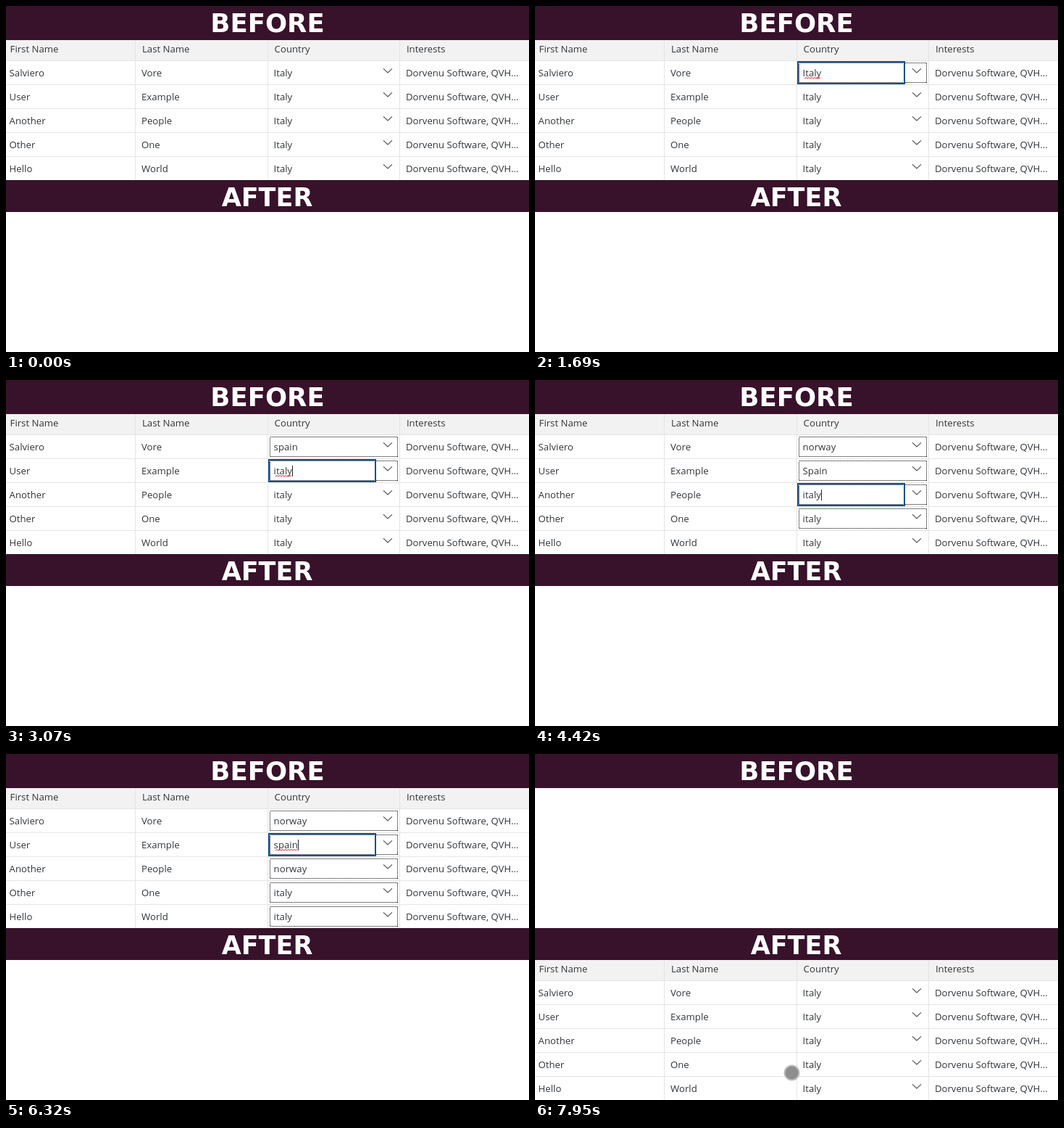
Recreate the animation shown at these times as an HTML page. Size 722 px wide and 477 px high, loop 8000 ms.

```html
<!DOCTYPE html>
<html lang="en">
<head>
<meta charset="utf-8">
<title>Before and after</title>
<style>
html, body { margin: 0; width: 100%; height: 100%; overflow: hidden; background: #fff; }
svg { display: block; width: 722px; height: 477px; }
text { font: 13.2px "Open Sans", "Noto Sans", sans-serif; fill: #32363a; white-space: pre; }
.title { font: bold 35.5px "DejaVu Sans", sans-serif; fill: #fff; text-anchor: middle; }
.band { fill: #38122a; }
.line { fill: #e5e5e5; }
.arrow { fill: none; stroke: #4a4d50; stroke-width: 1.1; }
.dots { fill: none; stroke: #000; stroke-dasharray: 1 1; shape-rendering: crispEdges; }
.focus { fill: none; stroke: #14508f; stroke-width: 2; }
.wave { fill: none; stroke: #e0233a; stroke-width: 1; }
</style>
</head>
<body>
<svg id="stage" viewBox="0 0 722 477"></svg>
<script>
const LOOP = 8000, SWITCH = 7870, ROW = 33;
const COLS = [0, 182.4, 365, 547.3];
const HEADS = ["First Name", "Last Name", "Country", "Interests"];
const PEOPLE = [["Salviero", "Vore"], ["User", "Example"], ["Another", "People"], ["Other", "One"], ["Hello", "World"]];
const INTERESTS = "Dorvenu Software, QVH…";
const WORDS = { I: "Italy", i: "italy", S: "Spain", s: "spain", n: "norway" };

// start, focused row, country per row, outlined rows, caret (c) and spelling wave (~)
const STEPS = [
  [0, 0, "IIIII", "", ""],
  [1130, 1, "IIIII", "1", "c~"],
  [1690, 1, "IIIII", "1", "~"],
  [1840, 1, "iIIII", "1", "c~"],
  [1990, 2, "iiIII", "12", "c~"],
  [2150, 3, "iiiII", "123", "c~"],
  [2300, 4, "iiiiI", "1234", "c~"],
  [2450, 5, "iiiiI", "12345", "c~"],
  [2600, 4, "iiiiI", "1234", "c~"],
  [2780, 1, "iiiiI", "1", "c~"],
  [2920, 1, "siiiI", "1", "c~"],
  [3070, 2, "siiiI", "12", "c~"],
  [3190, 3, "siiiI", "123", "c~"],
  [3340, 4, "siiiI", "1234", "c~"],
  [3480, 1, "siiiI", "1234", "c~"],
  [3600, 1, "niiiI", "1234", "c~"],
  [3820, 2, "niiiI", "1234", "c~"],
  [3970, 2, "nSiiI", "1234", "c~"],
  [4150, 3, "nSiiI", "1234", "c"],
  [4460, 3, "nSiiI", "1234", "c~"],
  [4560, 4, "nsiiI", "1234", "c~"],
  [4720, 5, "nsiii", "12345", "c~"],
  [4960, 3, "nsiii", "123", "c~"],
  [5110, 3, "nsnii", "123", "c~"],
  [5270, 4, "nsnii", "1234", "c~"],
  [5420, 5, "nsnii", "12345", "c~"],
  [5570, 5, "nsnii", "12345", "~"],
  [5720, 4, "nsnii", "12345", "c~"],
  [6180, 2, "nsnii", "12345", "c~"],
  [6380, 2, "nnnii", "12345", "c~"],
  [6600, 3, "nnnii", "12345", "c~"],
  [6820, 4, "nnnii", "12345", "c~"],
  [7000, 4, "nnnsi", "12345", "c"],
  [7180, 4, "nnnsi", "12345", "c~"],
  [7330, 3, "nnnsi", "12345", "c~"],
  [7500, 2, "nnnsi", "12345", "c~"]
];

const stage = document.getElementById("stage");

function add(parent, tag, attrs, text) {
  const el = document.createElementNS("http://www.w3.org/2000/svg", tag);
  for (const k in attrs) el.setAttribute(k, attrs[k]);
  if (text) el.textContent = text;
  return parent.appendChild(el);
}
const box = (p, cls, x, y, width, height) => add(p, "rect", { class: cls, x, y, width, height });
const show = (el, on) => { el.style.display = on ? "" : "none"; };

function table(top) {
  const g = add(stage, "g", { transform: `translate(0 ${top})` });
  add(g, "rect", { width: 722, height: 28, fill: "#f2f2f2" });
  for (let r = 0; r < 5; r++) box(g, "line", 0, 28 + r * ROW, 722, 1);
  for (const x of [178, 361, 543]) box(g, "line", x, 0, 1, 193);
  HEADS.forEach((h, c) => add(g, "text", { x: COLS[c] + 5.6, y: 17 }, h));
  const rows = PEOPLE.map((names, r) => {
    const row = add(g, "g", { transform: `translate(0 ${28 + r * ROW})` });
    const cells = [...names, "Italy", INTERESTS].map((s, c) =>
      add(row, "text", { x: COLS[c] + 4.6, y: 22 }, s));
    add(row, "path", { class: "arrow", d: "M521 11.3 L527 17 L533 11.3" });
    const dots = box(row, "dots", 364.5, 3.5, 176, 27);
    show(dots, false);
    return { country: cells[2], dots };
  });
  return { g, rows };
}

const before = table(47), after = table(284);
box(stage, "band", 0, 0, 722, 47);
box(stage, "band", 0, 240, 722, 44);
add(stage, "text", { class: "title", x: 361, y: 36 }, "BEFORE");
add(stage, "text", { class: "title", x: 360.5, y: 275.5, style: "font-size:35px" }, "AFTER");

const nameFocus = box(stage, "focus", 180, 77, 180, 30);
const field = add(stage, "g", {});
box(field, "focus", 363, 77, 147, 30);
const wave = add(field, "path", { class: "wave" });
const caret = add(field, "rect", { y: 85, width: 1, height: 15, fill: "#222" });
const pointer = add(stage, "circle", { r: 10, fill: "#8e8e8e", stroke: "#bcbcbc", "stroke-width": 2 });

function wavePath(x, end) {
  let d = `M${x} 100`;
  for (let up = true; x + 2 <= end; up = !up) d += `L${x += 2} ${up ? 98.5 : 100}`;
  return d;
}

function pointerAt(t) {
  if (t >= 60 && t < 1080) {
    const k = Math.min(1, Math.floor((t - 60) / 75) / 12);
    const e = k * k * (3 - 2 * k);
    return [500 - 250 * e, 217 - 134 * e];
  }
  if (t >= SWITCH) {
    const k = Math.min(2, Math.floor((t - SWITCH) / 40));
    return [362.5 - 4 * k, 443.5 - 2 * k];
  }
  return null;
}

let last = null;
function setStep(step) {
  if (step === last) return;
  last = step;
  const [, focus, words, dots, marks] = step;
  before.rows.forEach((row, r) => {
    row.country.textContent = WORDS[words[r]];
    show(row.dots, dots.includes(r + 1));
  });
  show(field, focus);
  if (!focus) return;
  field.setAttribute("transform", `translate(0 ${(focus - 1) * ROW})`);
  const end = 369.6 + before.rows[focus - 1].country.getComputedTextLength();
  wave.setAttribute("d", wavePath(372, end));
  caret.setAttribute("x", Math.round(end));
  show(wave, marks.includes("~"));
  show(caret, marks.includes("c"));
}

function draw() {
  const t = performance.now() % LOOP;
  const done = t >= SWITCH;
  show(before.g, !done);
  show(after.g, done);
  if (!done) setStep(STEPS.findLast(s => s[0] <= t));
  else { show(field, false); last = null; }
  show(nameFocus, t >= 960 && t < 1130);
  const p = pointerAt(t);
  show(pointer, p);
  if (p) pointer.setAttribute("transform", `translate(${p})`);
  requestAnimationFrame(draw);
}
draw();
</script>
</body>
</html>
```
